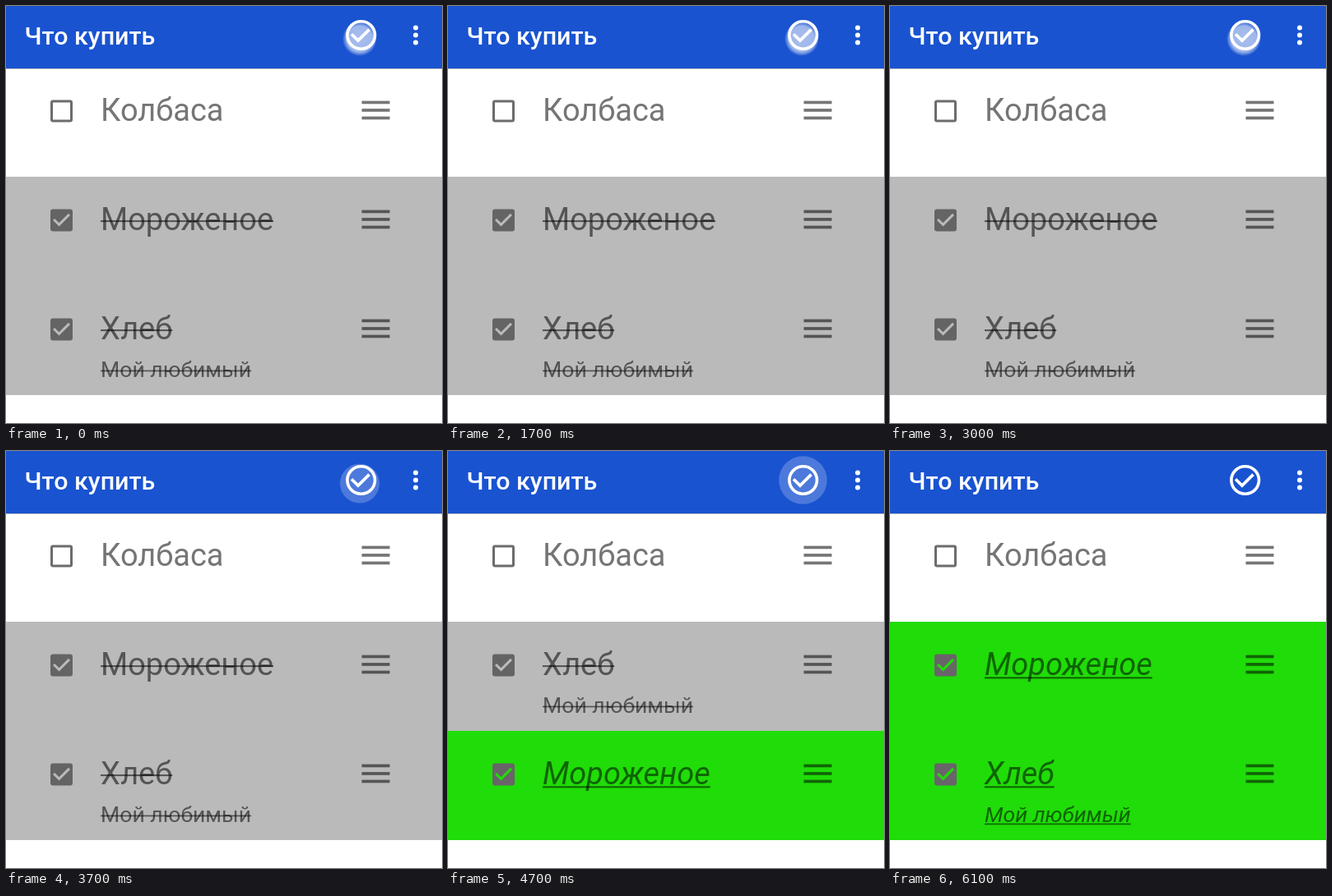
These frames come from a looping animation (530 px wide and 508 px high, 7400 ms). An HTML page with a canvas:

```html
<!DOCTYPE html>
<html lang="ru">
<head>
<meta charset="utf-8">
<title>Что купить</title>
<style>
html, body { margin: 0; width: 100%; height: 100%; overflow: hidden; background: #fff; }
canvas { display: block; width: 530px; height: 508px; }
</style>
</head>
<body>
<canvas id="stage"></canvas>
<script>
const W = 530, H = 508, LOOP = 7400, ROW_H = 133, FIRST_Y = 75;
const INK = 'rgba(0,0,0,.54)';
const canvas = document.getElementById('stage');
const ctx = canvas.getContext('2d');
const dpr = window.devicePixelRatio || 1;
canvas.width = W * dpr;
canvas.height = H * dpr;

const TICK = new Path2D('M-2 5l-5-5 1.41-1.41L-2 2.17l7.59-7.59L7 -4z');
const RING_TICK = new Path2D('M4.59-4.42L-2 2.17l-3.59-3.58L-7 0l5 5 8-8z');

const SAUSAGE = { name: 'Колбаса' };
const ICE = { name: 'Мороженое' };
const BREAD = { name: 'Хлеб', note: 'Мой любимый' };

const STYLES = {
  open: { bg: '#fff' },
  done: { bg: '#bababa', box: '#646464', line: 'strike' },
  fresh: { bg: '#20dc08', box: '#696469', line: 'under', italic: true }
};

// Each step lists the two lower rows and the touch mark on the icon.
const STEPS = [
  { from: 0, rows: [[ICE, 'done'], [BREAD, 'done']], touch: true },
  { from: 3700, rows: [[ICE, 'done'], [BREAD, 'done']], ripple: [430, 39.5, 24] },
  { from: 4400, rows: [[ICE, 'done'], [BREAD, 'done']], ripple: [431.2, 36.5, 28] },
  { from: 4700, rows: [[BREAD, 'done'], [ICE, 'fresh']], ripple: [431.5, 35.5, 29.3] },
  { from: 5100, rows: [[ICE, 'fresh'], [BREAD, 'fresh']] }
];

function rect(x, y, w, h, color) {
  ctx.fillStyle = color;
  ctx.fillRect(x, y, w, h);
}

function disc(x, y, r, color) {
  ctx.fillStyle = color;
  ctx.beginPath();
  ctx.arc(x, y, r, 0, Math.PI * 2);
  ctx.fill();
}

function icon(path, x, y, scale, color) {
  ctx.save();
  ctx.translate(x, y);
  ctx.scale(scale, scale);
  ctx.fillStyle = color;
  ctx.fill(path);
  ctx.restore();
}

function label(text, size, x, y, style) {
  ctx.font = `${style.italic ? 'italic ' : ''}${size}px Roboto, sans-serif`;
  ctx.fillStyle = INK;
  ctx.fillText(text, x, y);
  if (!style.line) return;
  const offset = style.line === 'strike' ? -size * 0.315 : size * 0.06;
  const weight = Math.max(1.7, size / 18);
  ctx.fillRect(x, y + offset, ctx.measureText(text).width, weight);
}

function checkbox(x, y, style) {
  ctx.beginPath();
  if (style.box) {
    ctx.roundRect(x - 13.5, y - 13.5, 27, 27, 3);
    ctx.fillStyle = style.box;
    ctx.fill();
    icon(TICK, x, y, 1.5, style.bg);
  } else {
    ctx.roundRect(x - 12, y - 12, 24, 24, 1.5);
    ctx.strokeStyle = '#6c6c6c';
    ctx.lineWidth = 3;
    ctx.stroke();
  }
}

function drawRow(index, item, style) {
  const top = FIRST_Y + index * ROW_H;
  rect(0, top, W, ROW_H, style.bg);
  checkbox(67.5, top + 53, style);
  label(item.name, 38, 115, top + 65, style);
  if (item.note) label(item.note, 26.6, 115, top + 111, style);
  for (const dy of [-9.5, 0, 9.5]) rect(432.5, top + 50.1 + dy, 34, 3.7, INK);
}

function drawTouch() {
  const glow = ctx.createRadialGradient(430, 40, 0, 430, 40, 21);
  glow.addColorStop(0, 'rgba(255,255,255,.62)');
  glow.addColorStop(0.74, 'rgba(255,255,255,.58)');
  glow.addColorStop(0.86, 'rgba(255,255,255,.34)');
  glow.addColorStop(1, 'rgba(255,255,255,0)');
  disc(430, 40, 21, glow);
}

function drawBar(step) {
  rect(0, 0, W, 76, '#1953d0');
  rect(0, 76, W, 1, '#b4b8bc');
  ctx.font = '500 30.4px Roboto, sans-serif';
  ctx.fillStyle = '#fff';
  ctx.fillText('Что купить', 22.5, 46.5);

  if (step.ripple) disc(...step.ripple, 'rgba(255,255,255,.22)');
  if (step.touch) drawTouch();
  ctx.beginPath();
  ctx.arc(431.7, 35.5, 16.8, 0, Math.PI * 2);
  ctx.strokeStyle = '#fff';
  ctx.lineWidth = 3.6;
  ctx.stroke();
  icon(RING_TICK, 431.7, 35.5, 1.86, '#fff');
  for (const y of [26.5, 35.5, 44.5]) disc(498, y, 3, '#fff');
}

function draw(t) {
  const step = STEPS.findLast(s => t >= s.from);
  ctx.setTransform(dpr, 0, 0, dpr, 0, 0);
  rect(0, 0, W, H, '#fff');
  drawRow(0, SAUSAGE, STYLES.open);
  step.rows.forEach(([item, style], i) => drawRow(i + 1, item, STYLES[style]));
  drawBar(step);
}

const start = performance.now();
function tick() {
  draw((performance.now() - start) % LOOP);
  requestAnimationFrame(tick);
}
tick();
</script>
</body>
</html>
```
